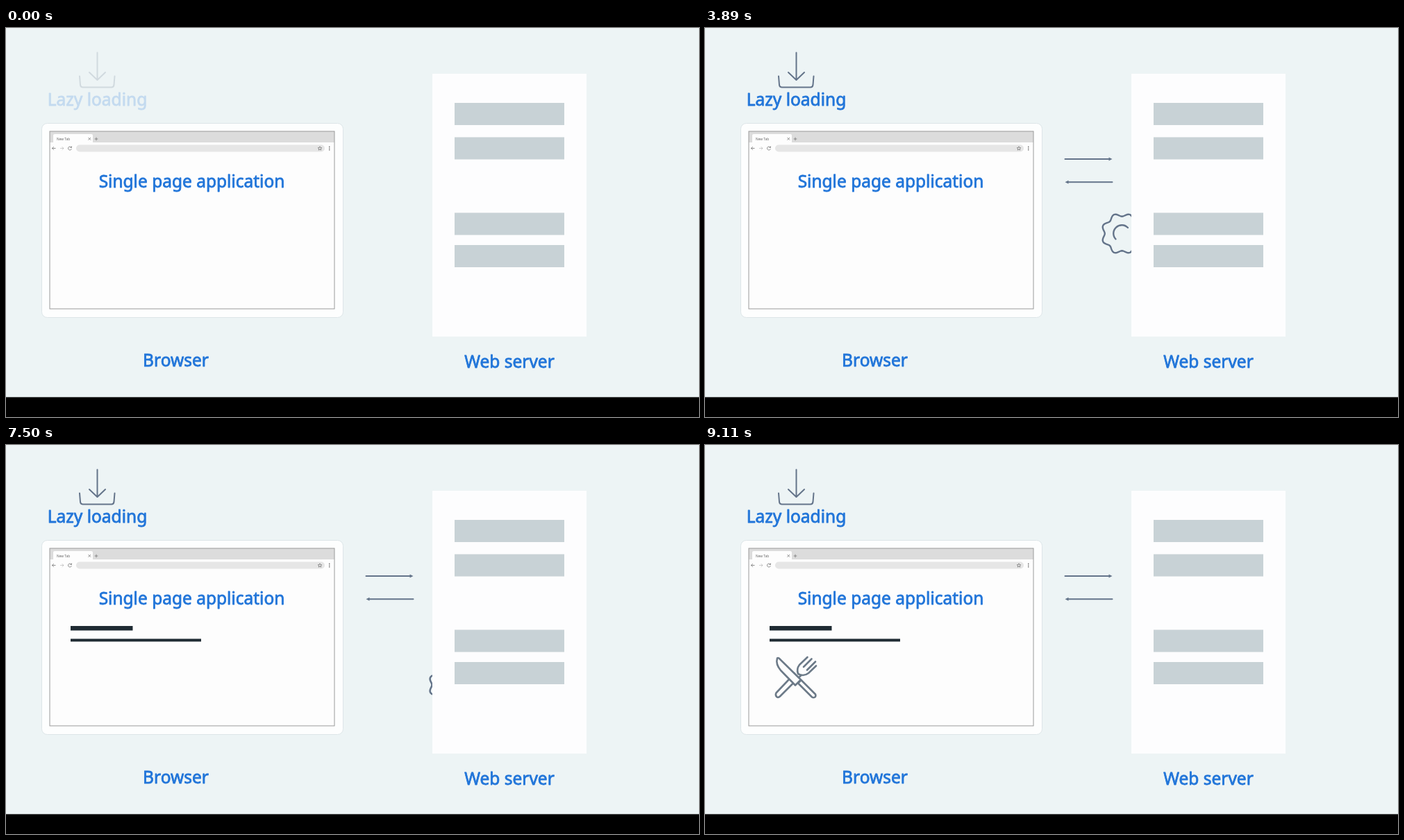
Write an HTML page that moves like this. It is 998x561 px and loops after 9.67 s.

```html
<!DOCTYPE html>
<html lang="en">
<head>
<meta charset="utf-8">
<title>Lazy loading in a single page application</title>
<style>
  html, body { margin: 0; width: 100%; height: 100%; overflow: hidden; background: #edf4f5; }
  svg { display: block; width: 100%; height: 100%; }
  .label { font: 24.5px "Noto Sans", "Open Sans", sans-serif; text-anchor: middle;
           fill: #2175d9; stroke: #2175d9; stroke-width: .8; stroke-linejoin: round; }
  .ink { fill: none; stroke: #64748a; stroke-width: 2; stroke-linecap: round; stroke-linejoin: round; }
  .tiny { fill: none; stroke: #777; stroke-width: .8; }
</style>
</head>
<body>
<svg viewBox="0 0 998 561">
  <rect width="998" height="561" fill="#edf4f5"/>

  <g id="lazy">
    <path class="ink" d="M131.5 35.5V74M120 64L131.5 75L143 64M106 69.5L107 82Q107.5 85.5 111 85.5H152Q155 85.5 155.5 82L156.5 69.5"/>
    <text class="label" x="131.5" y="112">Lazy loading</text>
  </g>

  <!-- browser window -->
  <rect x="51.5" y="137.5" width="434" height="280" rx="8" fill="#fdfefe" stroke="#dde5e8"/>
  <rect x="63" y="149" width="410" height="256" fill="#fdfdfd"/>
  <rect x="63" y="149" width="410" height="16" fill="#dcdcdc"/>
  <path d="M68 165V155Q68 153 70 153H123Q125 153 125 155V165Z" fill="#fdfdfd"/>
  <text x="73" y="161.8" font-family="Noto Sans, sans-serif" font-size="4.8" fill="#666">New Tab</text>
  <rect x="101" y="168.5" width="358" height="10" rx="5" fill="#e6e6e6"/>
  <path class="tiny" d="M118.5 158l3.6 3.6m0-3.6l-3.6 3.6M127.7 160h4.6M130 157.7v4.6
    M71.5 173.5h-5m2.3-2.3l-2.3 2.3l2.3 2.3M94 172a2.5 2.5 0 1 0 .4 2.3M94.5 170.5v2h-2"/>
  <path class="tiny" opacity=".45" d="M78 173.5h5m-2.3-2.3l2.3 2.3l-2.3 2.3"/>
  <path class="tiny" stroke-linejoin="round" d="M452 170.8l.8 1.8l2 .2l-1.5 1.3l.5 2l-1.8-1.1l-1.8 1.1l.5-2l-1.5-1.3l2-.2z"/>
  <path d="M465 170.5h1.4v1.4h-1.4zm0 2.3h1.4v1.4h-1.4zm0 2.3h1.4v1.4h-1.4z" fill="#777"/>
  <rect x="63" y="149" width="410" height="256" fill="none" stroke="#9a9a9a"/>
  <text class="label" x="267.5" y="230">Single page application</text>

  <path id="lines" d="M93 261h89.5v6.5H93zM93 279.5h188v4H93z" fill="#1f2b33"/>

  <g id="cutlery" class="ink" style="stroke:#6c7a88;stroke-width:2.6">
    <path d="M129 329.5L102.500 357.500Q101 360.500 103 363Q105.500 365 108 362.500L139 331.500"/>
    <path fill="#fdfdfd" d="M147.500 306L136 317Q131.500 323 134 330Q142 334.500 149 329L160 318.500"/>
    <path d="M153.500 308.500L142 320M159 312.500L147 324.500"/>
    <path fill="#fdfdfd" d="M104 307.500Q101.500 316 109 325L130 346.500L138 338.500L106.500 307.500Q105 306.500 104 307.500Z"/>
    <path fill="#fdfdfd" d="M138.500 339L159 359.500Q160 362 158.500 363.500Q156 365 154 363.500L134 343.500Z"/>
  </g>

  <g id="oneGear" class="ink" style="stroke-width:2.4">
    <path class="gear"/><path d="M-9 8A12 12 0 0 1 8.500 -8.500"/>
  </g>
  <g id="twoGears" class="ink" style="stroke-width:2.7">
    <g transform="scale(.925)"><path class="gear"/><path d="M-9 8A12 12 0 0 1 8.500 -8.500"/></g>
    <g transform="translate(34 -33.500)">
      <path class="gear" transform="scale(.55)" vector-effect="non-scaling-stroke"/>
      <path d="M-6.500 1.500A6.600 6.600 0 0 0 6.500 -1.500"/>
    </g>
  </g>

  <g id="request">
    <path class="ink" d="M518.500 189H583"/><path d="M581.500 186.500L586.500 189L581.500 191.500Z" fill="#64748a"/>
  </g>
  <g id="response">
    <path class="ink" d="M586.500 222.300H522"/><path d="M523.500 219.800L518.500 222.300L523.500 224.800Z" fill="#64748a"/>
  </g>

  <!-- server -->
  <rect x="614" y="66" width="222" height="379" fill="#fdfdfe"/>
  <path d="M646 108h158v32H646zM646 157.500h158v32H646zM646 266.500h158v32H646zM646 313h158v32H646z" fill="#c8d2d6"/>

  <text class="label" x="244.500" y="488">Browser</text>
  <text class="label" x="725" y="490">Web server</text>
  <rect y="532.400" width="998" height="29"/>
</svg>
<script>
const LOOP = 9670, FPS = 18;
const $ = id => document.getElementById(id);

// Eight-lobed wavy outline around the origin
const outline = Array.from({ length: 97 }, (_, i) => {
  const a = i / 96 * 2 * Math.PI, r = 27.2 - 2.5 * Math.cos(8 * a);
  return (r * Math.cos(a)).toFixed(2) + ' ' + (r * Math.sin(a)).toFixed(2);
});
document.querySelectorAll('.gear').forEach(p => p.setAttribute('d', 'M' + outline.join('L') + 'Z'));

const clamp = v => Math.max(0, Math.min(1, v));
const fade = (id, v) => $(id).style.opacity = clamp(v);

// Distance left before stopping: steady speed, then even braking
const BRAKE = 477;
function distanceLeft(ms, speed) {
  const t = Math.max(0, ms);
  return t < BRAKE ? speed * t * t / (2 * BRAKE) : speed * (t - BRAKE / 2);
}

function slide(id, frame, first, last, endX, y, endMs, speed) {
  const x = endX + distanceLeft(endMs - frame * 1000 / FPS, speed);
  $(id).setAttribute('transform', `translate(${x.toFixed(2)} ${y})`);
  fade(id, frame < first ? 0 : (last - frame) / 2);
}

function draw(now) {
  const frame = Math.floor((now % LOOP + 5) * FPS / 1000);
  fade('lazy', (frame + 2) / 10);
  fade('request', (frame - 9) / 8);
  fade('response', (frame - 51) / 8);
  slide('oneGear', frame, 66, 87, 367, 296.5, 4720, .394);
  fade('lines', (frame - 87) / 8);
  slide('twoGears', frame, 134, 154, 352.5, 346, 8400, .429);
  fade('cutlery', (frame - 157) / 7);
}

const start = performance.now();
function tick() {
  draw(performance.now() - start);
  requestAnimationFrame(tick);
}
tick();
</script>
</body>
</html>
```
